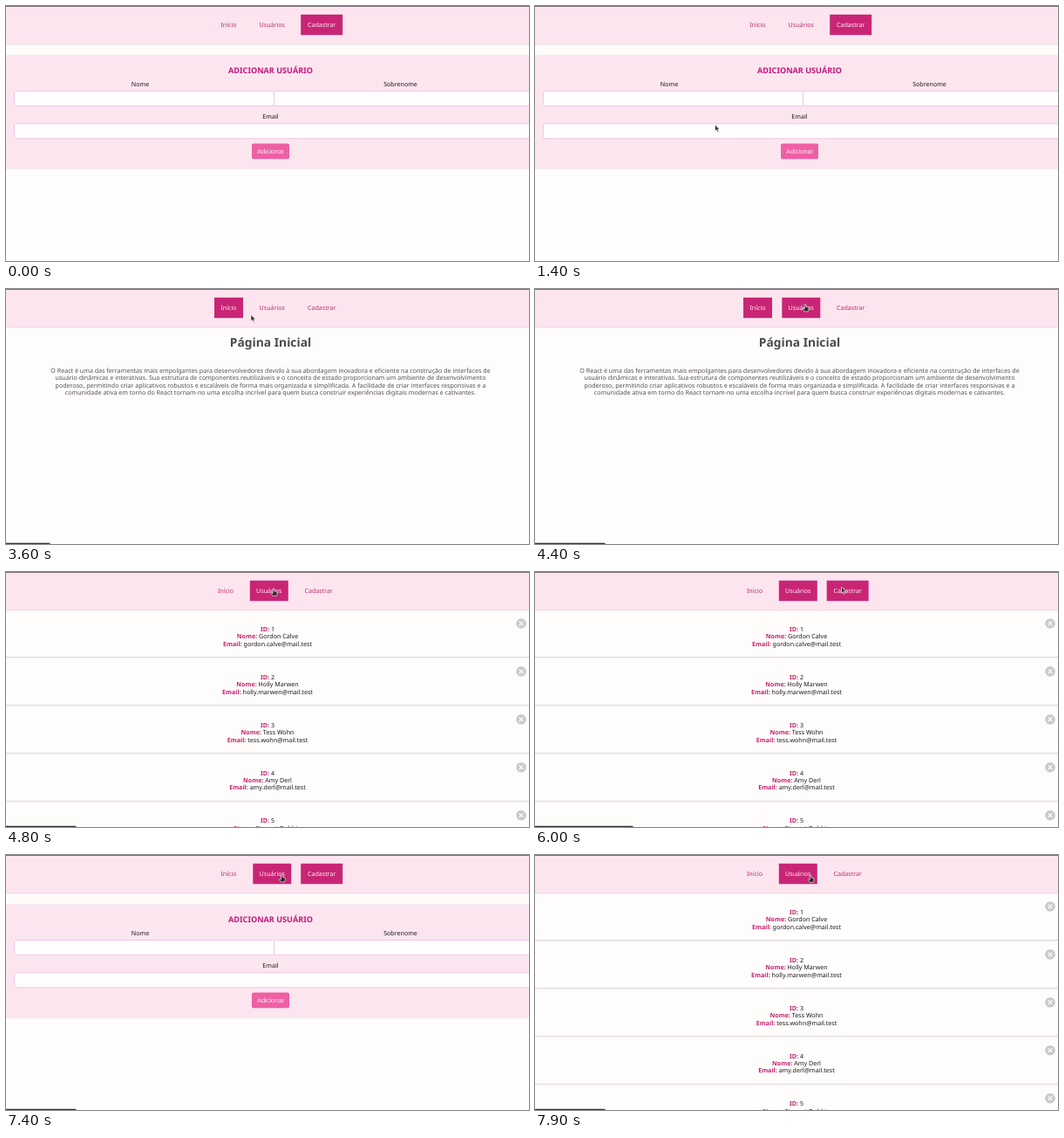
An HTML page that plays this animation: 600 px wide and 292 px high, repeating every 8000 ms.

```html
<!DOCTYPE html>
<html lang="pt">
<head>
<meta charset="utf-8">
<title>Cadastro de usuários</title>
<style>
  html, body { margin: 0; width: 100%; height: 100%; overflow: hidden; background: #fefdfc; }
  svg { display: block; width: 100%; height: 100%; }
  text { font: 7.12px "Noto Sans", sans-serif; text-anchor: middle; text-rendering: geometricPrecision; fill: #1c1a1b; }
  .label { font-weight: 700; fill: #c4206f; }
  .title { font-weight: 700; font-size: 9.1px; fill: #c2187a; }
  .heading { font-weight: 700; font-size: 13.8px; fill: #4c4a4b; }
  .body { fill: #55514f; }
  .button { font: 7.45px "Liberation Sans", sans-serif; fill: #fde9f3; }
  .field { fill: #fffdfd; stroke: #efc9e2; }
</style>
</head>
<body>
<svg id="stage" viewBox="0 0 600 292"></svg>
<script>
const LOOP = 8000, STEP = 100;
const stage = document.getElementById('stage');

const text = (x, y, content, cls = '') => `<text class="${cls}" x="${x}" y="${y}">${content}</text>`;
const rect = (x, y, w, h, attrs) => `<rect x="${x}" y="${y}" width="${w}" height="${h}" ${attrs}/>`;
const field = (x, y, w) => rect(x + .5, y + .5, w - 1, 17, 'rx="2" class="field"');
const shadow = y => rect(0, y, 600, 1, 'fill="#dedadb"') + rect(0, y + 1, 600, 1, 'fill="#f1eeee"');

const formPage = () =>
  rect(0, 56, 600, 131, 'fill="#f6eaf0"') +
  rect(0, 57, 600, 128.5, 'fill="#fbe6f0"') +
  text(303.5, 77.2, 'ADICIONAR USUÁRIO', 'title') +
  text(154, 92.2, 'Nome') + text(452.5, 92.2, 'Sobrenome') + text(303.5, 129.2, 'Email') +
  field(9, 97, 299) + field(307, 97, 299) + field(9, 134.3, 597) +
  rect(282, 157.5, 43, 17.8, 'rx="2" fill="#ef5fa4"') +
  text(303.5, 169, 'Adicionar', 'button');

const paragraph = [
  'O React é uma das ferramentas mais empolgantes para desenvolvedores devido à sua abordagem inovadora e eficiente na construção de interfaces de',
  'usuário dinâmicas e interativas. Sua estrutura de componentes reutilizáveis e o conceito de estado proporcionam um ambiente de desenvolvimento',
  'poderoso, permitindo criar aplicativos robustos e escaláveis de forma mais organizada e simplificada. A facilidade de criar interfaces responsivas e a',
  'comunidade ativa em torno do React tornam-no uma escolha incrível para quem busca construir experiências digitais modernas e cativantes.'
];
const homePage = () =>
  text(303.5, 66, 'Página Inicial', 'heading') +
  paragraph.map((line, i) => text(303.5, 95.8 + i * 8.45, line, 'body')).join('');

const users = ['Gordon Calve', 'Holly Marwen', 'Tess Wohn', 'Amy Derl', 'Stewart Dobbin'];
const userCard = (name, i) => {
  const y = i * 54.9;
  const email = name.toLowerCase().replace(' ', '.') + '@mail.test';
  const rows = [['ID', i + 1], ['Nome', name], ['Email', email]];
  return rows.map(([label, value], row) =>
      text(300, 67.8 + y + row * 8.45, `<tspan class="label">${label}:</tspan> ${value}`)).join('') +
    `<circle cx="591" cy="${59 + y}" r="5.8" fill="#cbcaca"/>` +
    `<path d="M588.7 ${56.7 + y}l4.6 4.6m0-4.6l-4.6 4.6" stroke="#fff" stroke-width="1.2"/>` +
    shadow(97 + y);
};
const usersPage = () => users.map(userCard).join('');

// Each link: label, left edge, width and the spans of time in which it is lit.
const links = [
  ['Início', 239, 33, [[1800, 4700]]],
  ['Usuários', 283.3, 44, [[3800, 6100], [7200, 9000]]],
  ['Cadastrar', 338.2, 48, [[-200, 2700], [5500, 7800]]]
];
const clamp = v => Math.max(0, Math.min(1, v));
const glow = (t, spans) => Math.max(...spans.map(([from, to]) =>
  Math.min(clamp((t - from) / 100 + .5), clamp((to - t) / 100 + .5))));
const mix = (a, b, k) => `rgb(${a.map((v, i) => v + (b[i] - v) * k)})`;

const header = (t, shift) =>
  rect(0, 0, 600, 43, 'fill="#fde5f0"') + rect(0, 0, 600, 1, 'fill="#77707a"') +
  rect(0, 43, 600, 1, 'fill="#efdde5"') + rect(0, 44, 600, 1, 'fill="#f8f3f4"') +
  links.map(([label, x, w, spans]) => {
    const k = glow(t, spans);
    return rect(x - shift, 9.8, w, 23.4, `fill="#c92575" opacity="${k}"`) +
      `<text x="${x - shift + w / 2}" y="24.2" style="fill:${mix([184, 48, 108], [255, 238, 247], k)}">${label}</text>`;
  }).join('');

// Value of the last [time, value] entry that has begun.
const at = (t, list) => list.filter(([start]) => start <= t).pop()[1];
const pages = [[0, formPage], [2700, homePage], [4700, usersPage], [6100, formPage], [7800, usersPage]];
const statusWidths = [[0, 0], [2200, 51], [3900, 81], [5700, 113], [7400, 81]];

const arrow = 'M0 0V7.2L1.7 5.8L2.8 8.3L4.1 7.7L3 5.3H5.2Z';
const hand = 'M-.8 0Q0-.8.8 0V2.8L4 3.6V6.2L3 8.4H-.8L-3 5.4L-2.2 4.6L-.8 5.4Z';
const pointers = [[0, arrow], [1900, hand], [2500, arrow], [3800, hand], [5200, arrow], [5500, hand], [5900, arrow], [7200, hand]];
const track = [
  [800, 466, 14], [1200, 44, 110], [1600, 369, 162], [1900, 258, 20], [2200, 258, 22.5],
  [3300, 258, 22.5], [3600, 281, 29.5], [4000, 313, 16], [4300, 313, 16], [4500, 307, 19],
  [5000, 307, 19], [5800, 351.5, 17], [7000, 351.5, 17], [7400, 316.3, 22.5], [7700, 316, 23], [8000, 316, 23]
];
const pointer = t => {
  const next = track.findIndex(([time]) => time > t);
  if (next < 1) return '';
  const [t0, x0, y0] = track[next - 1], [t1, x1, y1] = track[next];
  const k = (t - t0) / (t1 - t0);
  return `<path d="${at(t, pointers)}" transform="translate(${x0 + (x1 - x0) * k} ${y0 + (y1 - y0) * k})"
    fill="#2c2a2c" stroke="#f2edf0" stroke-width=".7" stroke-linejoin="round"/>`;
};

let shown = -1;
function frame(now) {
  const t = Math.floor(now % LOOP / STEP) * STEP;
  if (t !== shown) {
    shown = t;
    const page = at(t, pages), status = at(t, statusWidths);
    stage.innerHTML = rect(0, 0, 600, 292, 'fill="#fefdfc"') + page() +
      header(t, page === usersPage ? 3.5 : 0) +
      (status ? rect(-3, 290.8, status + 3, 5, 'rx="2" fill="#37333a"') : '') +
      pointer(t);
  }
  requestAnimationFrame(frame);
}
requestAnimationFrame(frame);
</script>
</body>
</html>
```
